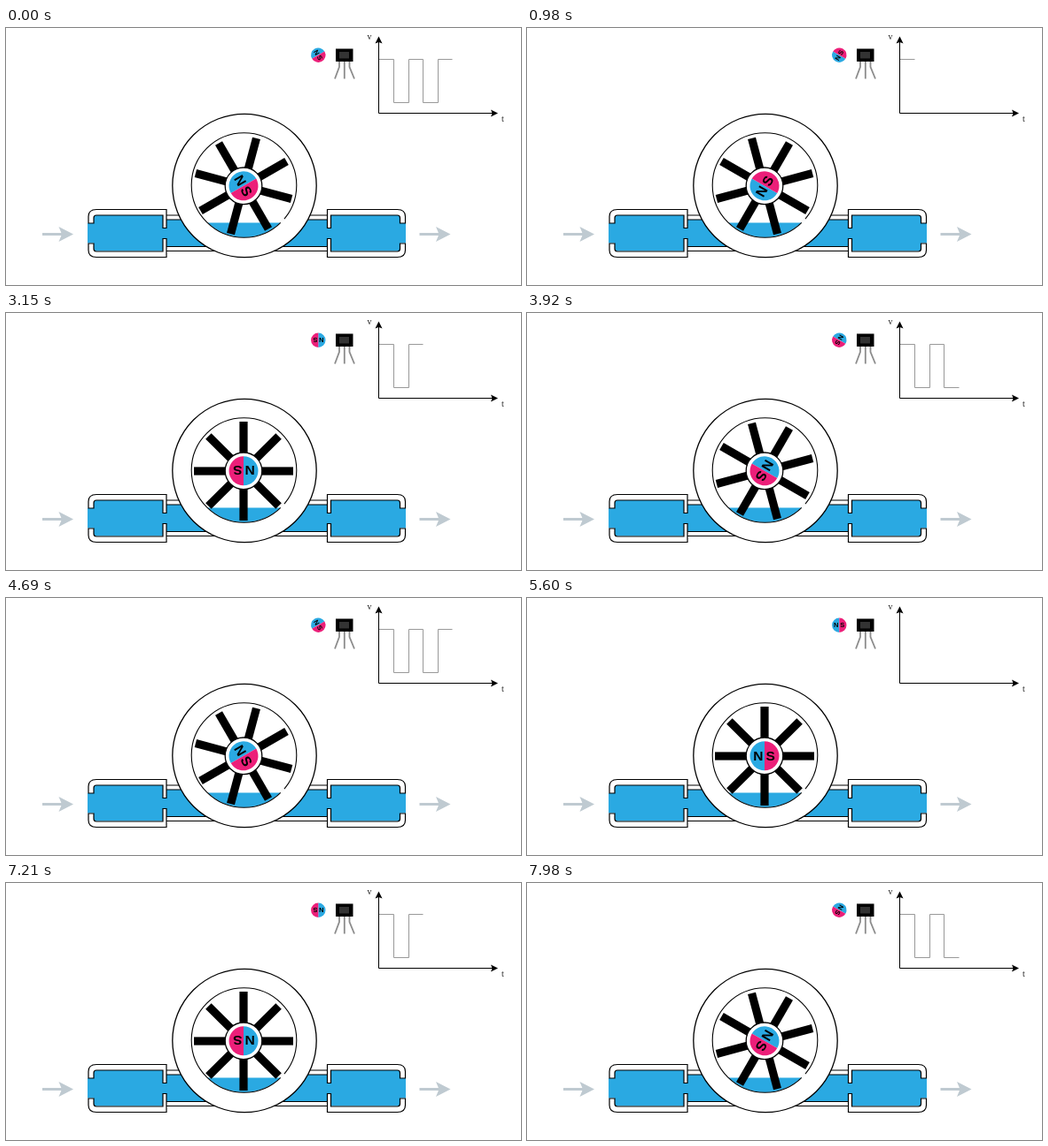
Write an HTML page with a canvas that moves like this. It is 581 px wide and 291 px high and loops after 8 s.

```html
<!DOCTYPE html>
<html lang="en">
<head>
<meta charset="utf-8">
<title>Turbine flow meter</title>
<style>
html, body { margin: 0; width: 100%; height: 100%; overflow: hidden; background: #fff; }
canvas { display: block; width: 581px; height: 291px; }
</style>
</head>
<body>
<canvas id="stage"></canvas>
<script>
const W = 581, H = 291, LOOP = 8000, TICK = 70;
const BLUE = '#2aa9e2', PINK = '#ec1f79', INK = '#000';
const TAU = Math.PI * 2;
const canvas = document.getElementById('stage');
const ctx = canvas.getContext('2d');
const dpr = window.devicePixelRatio || 1;
canvas.width = W * dpr;
canvas.height = H * dpr;

function path(points, fill, stroke, width = 1) {
  ctx.beginPath();
  points.forEach(([x, y], i) => i ? ctx.lineTo(x, y) : ctx.moveTo(x, y));
  paint(fill, stroke, width);
}

function paint(fill, stroke, width) {
  if (fill) { ctx.fillStyle = fill; ctx.fill(); }
  if (stroke) { ctx.strokeStyle = stroke; ctx.lineWidth = width; ctx.stroke(); }
}

function disc(x, y, r, fill, stroke, width = 1.2) {
  ctx.beginPath();
  ctx.arc(x, y, r, 0, TAU);
  paint(fill, stroke, width);
}

function rect(x, y, w, h, color) {
  ctx.fillStyle = color;
  ctx.fillRect(x, y, w, h);
}

function label(text, x, y, font, color = INK) {
  ctx.font = font;
  ctx.fillStyle = color;
  ctx.textAlign = 'center';
  ctx.textBaseline = 'alphabetic';
  ctx.fillText(text, x, y);
}

function at(x, y, angle, draw) {
  ctx.save();
  ctx.translate(x, y);
  ctx.rotate(angle);
  draw();
  ctx.restore();
}

function magnet(x, y, r, size, angle) {
  at(x, y, angle, () => {
    for (const [color, start] of [[BLUE, TAU / 4], [PINK, -TAU / 4]]) {
      ctx.beginPath();
      ctx.arc(0, 0, r, start, start + TAU / 2);
      paint(color);
    }
    const font = `bold ${size}px "Liberation Sans", Arial, sans-serif`;
    label('N', -r * 0.43, size * 0.36, font);
    label('S', r * 0.41, size * 0.36, font);
  });
}

// Upper wall of the left fitting; flips give the other three.
function wall() {
  ctx.beginPath();
  ctx.moveTo(93, 221);
  ctx.lineTo(93, 213.5);
  ctx.quadraticCurveTo(93, 205.5, 102, 205.5);
  ctx.lineTo(181, 205.5);
  ctx.lineTo(181, 226.5);
  ctx.lineTo(177, 226.5);
  ctx.lineTo(177, 212);
  ctx.lineTo(102, 212);
  ctx.quadraticCurveTo(99, 212, 99, 215);
  ctx.lineTo(99, 221);
  ctx.closePath();
  paint('#fff', INK, 1.2);
}

function pipe() {
  rect(92, 221, 359, 22.5, BLUE);
  rect(99, 212, 78, 40.5, BLUE);
  rect(366.5, 212, 78, 40.5, BLUE);
  rect(177, 217, 189, 30.5, BLUE);
  for (const y of [212, 217, 247.5, 252.5]) path([[181, y], [362.5, y]], null, INK, 1);
  for (const sx of [1, -1]) for (const sy of [1, -1]) {
    ctx.save();
    ctx.translate(sx < 0 ? 543.5 : 0, sy < 0 ? 465 : 0);
    ctx.scale(sx, sy);
    wall();
    ctx.restore();
  }
}

function flowArrow(x) {
  rect(x, 232, 23, 3, '#bfcad1');
  path([[x + 18.5, 225], [x + 35, 233.5], [x + 18.5, 242], [x + 22, 233.5]], '#bfcad1');
}

function wheel(angle) {
  disc(269, 178.5, 81.2, '#fff', INK, 1.3);
  ctx.save();
  ctx.beginPath();
  ctx.arc(268.5, 178, 59, 0, TAU);
  ctx.clip();
  rect(205, 220.5, 130, 20, BLUE);
  ctx.restore();
  disc(268.5, 178, 59.3, null, INK, 1.1);
  ctx.beginPath();
  ctx.arc(268.5, 178, 59.3, 0.7, 0.8);
  paint(null, '#fff', 2);
  for (let i = 0; i < 8; i++) {
    at(268, 179, angle + i * TAU / 8, () => rect(18, -4.6, 38, 9.2, INK));
  }
  disc(268, 178.8, 20.8, '#fff', INK, 1.3);
  magnet(268, 178.8, 16.5, 15.5, angle);
}

function sensor(angle) {
  magnet(352.3, 30.7, 8.2, 7.5, angle);
  for (const [x, foot] of [[376, 371], [381.8, 381.8], [387.5, 393]]) {
    path([[x, 37], [x, 44], [foot, 57.5]], null, '#8c8c8c', 1.8);
  }
  rect(372, 23.5, 19.5, 14.5, INK);
  rect(376, 27, 11, 7.5, '#333');
}

function chart(count) {
  const xs = [420.5, 437.5, 454.5, 470.5, 487.5, 503.5, 520.5];
  const line = [];
  for (let i = 0; i < count; i++) {
    const y = i % 2 ? 84.5 : 35.5;
    line.push([xs[i], y], [xs[i + 1], y]);
  }
  if (count) path(line, null, '#999', 1);
  path([[420.5, 14], [420.5, 96.5], [550, 96.5]], null, INK, 1);
  path([[420.5, 9.5], [424.5, 17.5], [420.5, 16], [416.5, 17.5]], INK);
  path([[555, 96.5], [547, 92.5], [548.5, 96.5], [547, 100.5]], INK);
  const font = '10px "Liberation Serif", Times, serif';
  label('v', 410, 13, font, '#222');
  label('t', 560.5, 105.5, font, '#222');
}

function draw(now) {
  const tick = Math.floor((now % LOOP) / TICK);
  // One sixth of a turn and one more pulse edge every 1.38 ticks.
  const turn = Math.ceil((tick - 13.03) / 1.38);
  const step = ((turn % 7) + 7) % 7;
  const angle = -step * TAU / 6;
  ctx.setTransform(dpr, 0, 0, dpr, 0, 0);
  rect(0, 0, W, H, '#fff');
  flowArrow(41);
  flowArrow(466.5);
  pipe();
  wheel(angle);
  sensor(angle);
  chart(step);
}

const start = performance.now();
function loop() {
  draw(performance.now() - start);
  requestAnimationFrame(loop);
}
loop();
</script>
</body>
</html>
```
